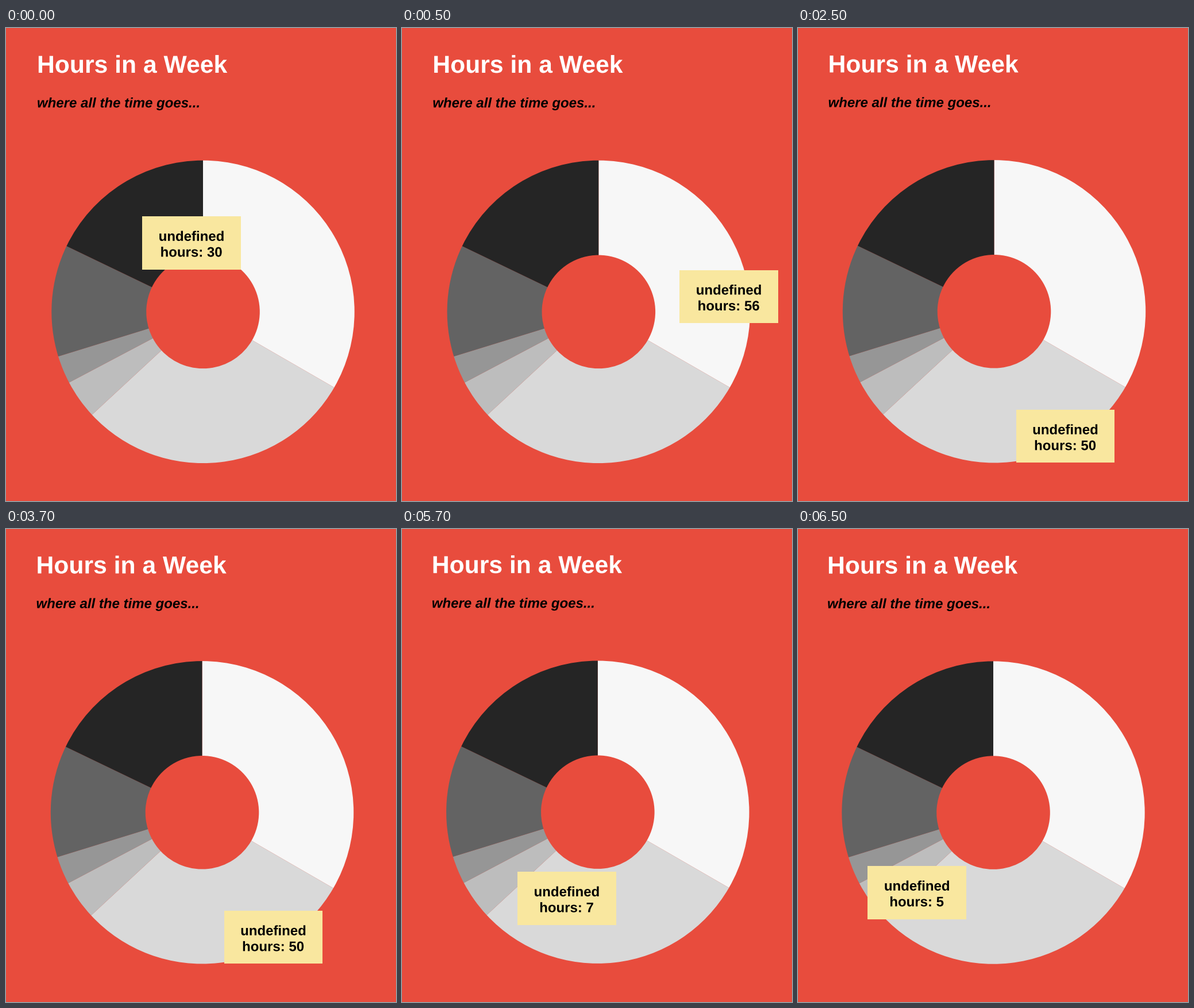
These frames come from a looping animation (679x824 px, 8 s). A matplotlib script:

```python
import matplotlib.pyplot as plt
from matplotlib.animation import FuncAnimation
from matplotlib.patches import PathPatch, Rectangle, Wedge
from matplotlib.textpath import TextPath
from matplotlib.transforms import Affine2D

WIDTH, HEIGHT, DPI = 679, 824, 64
STEP_MS, STEPS = 500, 16

HOURS = [56, 50, 7, 5, 20, 30]
GREYS = ["#f7f7f7", "#d9d9d9", "#bdbdbd", "#969696", "#636363", "#252525"]
CENTER, OUTER, INNER = (343, 494.4), 263.7, 98.8
TIP_W, TIP_H = 171.5, 92.2

# (first step, hovered hours, tooltip corner, drift of the page)
STOPS = [
    (0, 30, (237.2, 328.3), (0, 0)),
    (1, 56, (483.3, 421.9), (-0.7, 0)),
    (5, 50, (379.7, 665.2), (-1.5, -0.6)),
    (9, 7, (201.1, 597.4), (-2.2, -1.2)),
    (13, 5, (121.4, 587.3), (-3, -0.3)),
]

fig = plt.figure(figsize=(WIDTH / DPI, HEIGHT / DPI), dpi=DPI, facecolor="#e84c3d")
ax = fig.add_axes([0, 0, 1, 1], xlim=(0, WIDTH), ylim=(HEIGHT, 0))
ax.axis("off")

page_shift, tip_shift = Affine2D(), Affine2D()


def text_path(text, x, y, size, style="normal", centered=False):
    font = dict(family="Liberation Sans", weight="bold", style=style)
    path = TextPath((0, 0), text, size=size, prop=font)
    if centered:
        box = path.get_extents()
        x -= (box.x0 + box.x1) / 2
    return Affine2D().scale(1, -1).translate(x, y).transform_path(path)


def add(patch, shift):
    patch.set(linewidth=0, transform=shift + ax.transData)
    return ax.add_artist(patch)


def hours_path(hours):
    return text_path(f"hours: {hours}", TIP_W / 2, 70.1, 24, centered=True)


start = -90
for hours, grey in zip(HOURS, GREYS):
    end = start + 360 * hours / sum(HOURS)
    add(Wedge(CENTER, OUTER, start, end, width=OUTER - INNER, color=grey), page_shift)
    start = end

title = text_path("Hours in a Week", 54, 78, 42.67)
subtitle = text_path("where all the time goes...", 54, 138.4, 24, style="italic")
add(PathPatch(title, color="white"), page_shift)
add(PathPatch(subtitle, color="black"), page_shift)

add(Rectangle((0, 0), TIP_W, TIP_H, color="#f9e79f"), tip_shift)
label = text_path("undefined", TIP_W / 2, 42.5, 24, centered=True)
add(PathPatch(label, color="black"), tip_shift)
count = add(PathPatch(hours_path(HOURS[-1]), color="black"), tip_shift)


def update(step):
    _, hours, corner, drift = [stop for stop in STOPS if stop[0] <= step][-1]
    page_shift.clear().translate(*drift)
    tip_shift.clear().translate(*corner)
    count.set_path(hours_path(hours))
    return [count]


anim = FuncAnimation(fig, update, frames=STEPS, interval=STEP_MS,
                     init_func=lambda: update(0), repeat=True, repeat_delay=0)
plt.show()
```
